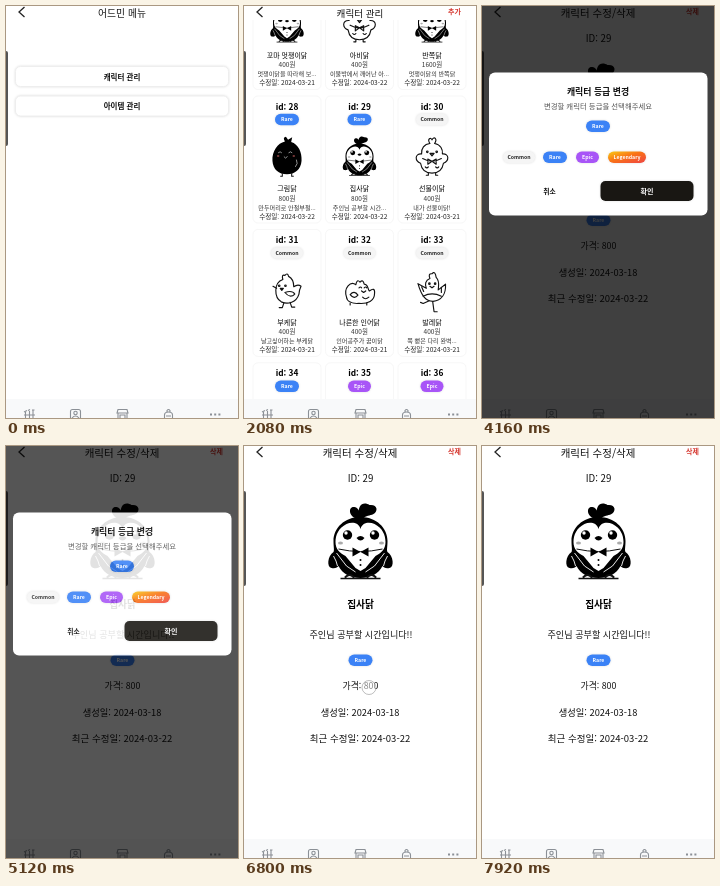
These frames come from a looping animation (232x412 px, 8 s). An HTML page:

```html
<!DOCTYPE html>
<html lang="ko">
<meta charset="utf-8">
<style>
  html, body { margin: 0; width: 100%; height: 100%; overflow: hidden; background: #fff; }
  svg { display: block; width: 232px; height: 412px; }
  text { font-family: "Noto Sans CJK KR", "Noto Sans", sans-serif; white-space: pre; }
  .soft { filter: drop-shadow(0 .6px .8px #0002); }
  .line { fill: #fff; stroke: #111; stroke-width: 2.2; stroke-linejoin: round; stroke-linecap: round; }
  .icon { fill: none; stroke: #8b9096; stroke-width: 1.1; }
  .pic { visibility: var(--pic); }
</style>
<svg id="stage" viewBox="0 0 232 412">
  <defs>
    <linearGradient id="legend" x2="1" y2="1">
      <stop stop-color="#facc15"/><stop offset=".45" stop-color="#f97316"/><stop offset="1" stop-color="#ef4444"/>
    </linearGradient>
    <g id="butler">
      <path d="M-2-23C-12-24-13-36-6-35C-1-34-1-29-1-26C-4-37 3-41 9-37C17-38 18-31 13-28C9-26 6-27 2-23Z"/>
      <path stroke="#111" stroke-width="1.500" d="M-20 36.500H20"/>
      <path d="M0-25C16-25 27-14 27-1C27 5 26 8 27 10C33 14 34 25 29 26C25 27 23 25 22 24C18 32 10 36 0 36C-10 36-18 32-22 24C-23 25-25 27-29 26C-34 25-33 14-27 10C-26 8-27 5-27-1C-27-14-16-25 0-25Z"/>
      <path fill="#fff" d="M0-13C2-20 9-20 14-18C22-14 25-7 25 0C25 7 21 11 15 14L5 26L0 29L-5 26L-15 14C-21 11-25 7-25 0C-25-7-22-14-14-18C-9-20-2-20 0-13Z"/>
      <path fill="none" stroke="#111" d="M-22 7Q0 12 22 7"/>
      <path fill="none" stroke="#fff" stroke-width=".9" d="M-24 11L-14 24L-5 30M24 11L14 24L5 30M-27 14Q-24 19-23 24M27 14Q24 19 23 24"/>
      <circle cx="-13" cy="-7" r="4.700"/><circle cx="14" cy="-7" r="4.700"/>
      <g fill="#fff"><circle cx="-14.500" cy="-9" r="1.700"/><circle cx="12.500" cy="-9" r="1.700"/></g>
      <path d="M-4-4Q0-8 4-4Q0 1-4-4Z"/>
      <path d="M0 10L-8 5.500V14.500ZM0 10L8 5.500V14.500Z"/>
      <circle cy="18" r="1"/><circle cy="23" r="1"/>
      <g fill="#aaa"><ellipse cx="-20" cy="1" rx="2.500" ry="1.500"/><ellipse cx="21" cy="1" rx="2.500" ry="1.500"/></g>
      <g class="line" stroke-width="1"><path d="M-15 35q4-4 8 0M7 35q4-4 8 0"/></g>
    </g>
    <g id="inky">
      <path d="M-4-29Q-9-37-2-38L2-32L10-37L8-28C22-24 29-8 28 8C27 25 15 34 0 34C-16 34-27 25-28 8C-29-10-18-26-4-29Z"/>
      <path d="M-9 32v6h-4M9 32v6h4" stroke="#111" stroke-width="2" fill="none"/>
      <path fill="none" stroke="#bbb" stroke-width="1.500" d="M-17-7q4-4 7 0M3-7q4-4 7 0M-6 0l3 3l4-3M18 6q4 8-2 14"/>
      <path stroke="#d66" stroke-width="2" d="M-19-1h4M11-1h4"/>
    </g>
    <g id="plump" class="line">
      <path d="M-4-25C-10-34-2-38 0-32C4-40 11-34 5-25C17-23 21-13 20-5C34-6 33 9 22 13C20 26 12 32 0 32C-12 32-20 26-22 13C-33 9-34-6-20-5C-21-15-15-24-4-25Z"/>
      <path d="M-18 4Q0 14 18 4M0 9L-8 5V15ZL8 5V15ZM-7 32v4h-4M7 32v4h4M-13 20q3 4 6 0M7 20q3 4 6 0"/>
      <path fill="#999" d="M-4-6H4L0-1Z"/>
      <circle cx="-9" cy="-9" r="1.500"/><circle cx="9" cy="-9" r="1.500"/>
    </g>
    <g id="runner" class="line">
      <path d="M-8-20Q-11-30-4-28Q1-34 3-26C11-22 13-12 13-6Q21-12 27-7Q23 1 23 8C18 24 2 29-11 23C-25 15-26-14-8-20Z"/>
      <path d="M-20-3l-7-4M-4 5Q10 0 15 8Q6 17-4 5M-6 25l-3 9h-6M6 24l3 9h6"/>
      <path fill="#999" d="M-13-3h6l-3 4Z"/>
      <circle cx="-15" cy="-8" r="1.500"/><circle cx="-3" cy="-8" r="1.500"/>
    </g>
    <g id="loaf" class="line">
      <path d="M-25 14C-31-4-17-18-7-10Q-5-22 1-15Q7-21 9-11C18-10 15-1 19 2Q30-6 29 6C29 22 16 27-1 26C-15 27-24 22-25 14Z"/>
      <path d="M-18 9Q-10 0-3 10Q-10 19-18 9M-1-4q3-3 5 0M9-4q3-3 5 0M4 2l4 3l4-3M6 14q5 6 12 0M-18 26v3M14 25v4"/>
    </g>
    <g id="dancer" class="line">
      <path d="M1 20L4 42h6M-3 20l-14 6l-5-2"/>
      <path d="M-4-22Q-8-32 0-31Q6-38 8-24C16-16 12-6 12 0L26-11C27 8 18 20 2 22C-12 22-20 12-27-12L-11-3C-14-10-13-19-4-22Z"/>
      <path d="M-17 12Q0 3 18 12M-4-7l4 3l4-3M18-5v10M-20-6l4 9"/>
      <circle cx="-5" cy="-12" r="1.500"/><circle cx="6" cy="-12" r="1.500"/>
    </g>
  </defs>
</svg>
<script>
const stage = document.getElementById('stage');

const text = (x, y, str, size, fill = '#111', weight = 400) =>
  `<text x="${x}" y="${y + .4 + size * .36}" font-size="${size}" fill="${fill}" font-weight="${weight}" text-anchor="middle">${str}</text>`;
const box = (x, y, w, h, r, attrs) => `<rect x="${x}" y="${y}" width="${w}" height="${h}" rx="${r}" ${attrs}/>`;
const group = (id, body) => `<g id="${id}">${body}</g>`;

const GRADES = {
  Common: ['#f5f5f5', 32, '#222'], Rare: ['#3b82f6', 24, '#fff'],
  Epic: ['#a855f7', 23, '#fff'], Legendary: ['url(#legend)', 38, '#fff'],
};
const badge = (x, y, name) => {
  const [bg, w, ink] = GRADES[name];
  return box(x - w / 2, y - 5.5, w, 11.5, 5.75, `fill="${bg}" class="soft"`) + text(x, y - .4, name, 5.2, ink, 700);
};

const header = (title, size, action = '') =>
  box(0, 0, 232, 14, 0, 'fill="#fff"') + text(116, 7.3, title, size) + text(210.500, 5.3, action, 7, '#d63a32', 600);

const menuButton = (y, label) =>
  box(9.5, y, 213, 20, 5, 'fill="#fff" stroke="#eee" class="soft"') + text(116, y + 10, label, 7.5, '#111', 700);

// picture, name, price, description, day
const birds = [
  ['butler', '꼬마 멋쟁이닭', 400, '멋쟁이닭을 따라해 보...', 21],
  ['plump', '아비닭', 400, '이불밖에서 깨어난 아...', 22],
  ['butler', '반쪽닭', 1600, '멋쟁이닭의 반쪽닭', 22],
  ['inky', '그림닭', 800, '만두머리로 안절부절...', 22],
  ['butler', '집사닭', 800, '주인님 공부할 시간...', 22],
  ['plump', '선물이닭', 400, '내가 선물이닭!', 21],
  ['runner', '부케닭', 400, '날고싶어하는 부케닭', 21],
  ['loaf', '나른한 인어닭', 400, '인어공주가 꿈이닭', 21],
  ['dancer', '발레닭', 400, '쭉 뻗은 다리 완벽...', 21],
];
const ranks = 'Rare Rare Common Common Common Common Rare Epic Epic'.split(' ');

const card = id => {
  const x = [43, 115.500, 188][(id - 1) % 3], y = 38 + Math.floor((id - 1) / 3) * 133.4;
  const [pic, name, price, note, day] = birds[(id + 2) % 9];
  return box(x - 34, y - 10, 68, 127, 5, 'fill="#fff" stroke="#f7f7f7"') +
    text(x, y + .3, 'id: ' + id, 8.3, '#000', 700) + badge(x, y + 13.3, ranks[(id + 8) % 9]) +
    `<use href="#${pic}" class="pic" transform="translate(${x} ${y + 50.5}) scale(.52)"/>` +
    text(x, y + 82.500, name, 7, '#000', 500) + text(x, y + 92, price + '원', 6.5, '#333') +
    text(x, y + 101, note, 6.1, '#333') + text(x, y + 110, `수정일: 2024-03-${day}`, 6.6, '#222');
};

const panel = (id, topic, verb, body) => group(id,
  box(0, 0, 232, 412, 0, 'fill="#000" opacity=".75"') + box(7, 66.500, 218.500, 143, 6, 'fill="#fff"') +
  text(116, 85.500, `캐릭터 ${topic} 변경`, 8.9, '#111', 700) +
  text(116, 99.500, `변경할 캐릭터 ${topic}을 ${verb}해주세요`, 7.4, '#555') + body +
  text(67.500, 185, '취소', 6.8, '#111', 600) +
  box(118.500, 175, 93, 20, 5, 'fill="#191713" class="soft"') + text(165, 185, '확인', 7, '#fff', 600));

const tabs = box(0, 393, 232, 19, 0, 'fill="#f8f9fa"') + `<g class="icon">
  <path d="M18 409H29M19.500 412V406M23.500 412V405M27 412V404M18 406l3-1.500M22 404.500l2-1M26 404h2.500"/>
  <rect x="64.500" y="403.500" width="10" height="10" rx="2"/><circle cx="69.500" cy="407" r="1.700"/><path d="M66 412q3.500-4 7 0"/>
  <path d="M112 403.500H121L122 407H111ZM112 407V413M121 407V413M114 412V409H119V412"/>
  <path d="M158.500 413V409Q158.500 406 162.500 406T166.500 409V413M161 406V404.500q1.500-2 3 0V406M160 410H165"/>
  <path stroke-width="2" stroke-dasharray="2 2.200" d="M204 408.500H215"/></g>`;

stage.innerHTML += group('menu', header('어드민 메뉴', 9.8) + menuButton(60.500, '캐릭터 관리') + menuButton(90, '아이템 관리')) +
  group('list', box(0, 0, 232, 412, 0, 'fill="#fff"') +
    group('rows', Array.from({ length: 36 }, (_, i) => card(i + 1)).join('')) + header('캐릭터 관리', 9.6, '추가')) +
  group('detail', box(0, 0, 232, 412, 0, 'fill="#fff"') + header('캐릭터 수정/삭제', 10.5, '삭제') +
    text(116.500, 32, 'ID: 29', 9.7) + '<use href="#butler" x="116.500" y="96"/>' +
    text(116.500, 158, '집사닭', 9.7, '#000', 700) + text(117, 188, '주인님 공부할 시간입니다!!', 9.1) +
    badge(116.500, 214, 'Rare') + text(116.500, 239.500, '가격: 800', 8.8) +
    text(116, 266.500, '생성일: 2024-03-18', 9.3) + text(116, 292, '최근 수정일: 2024-03-22', 9.5)) +
  tabs + '<path d="M18.500 1L13 6L18.500 11" fill="none" stroke="#222" stroke-width="1.300"/>' +
  box(-2, 45, 4, 95, 2, 'fill="#555"') +
  panel('grade', '등급', '선택', badge(116, 120, 'Rare') + badge(37, 151, 'Common') +
    badge(73, 151, 'Rare') + badge(105.500, 151, 'Epic') + badge(145, 151, 'Legendary')) +
  panel('price', '가격', '입력', text(116, 136, '800', 9)) +
  '<circle id="touch" r="7" fill="#fff" fill-opacity=".5" stroke="#777" stroke-opacity=".6" stroke-width=".8"/>';

const el = id => document.getElementById(id);
const ramp = (t, from, to) => Math.min(1, Math.max(0, (t - from) / (to - from)));
const show = (id, opacity) => {
  el(id).style.opacity = opacity;
  el(id).style.display = opacity > 0 ? '' : 'none';
};

// start, end, x, y
const touches = [[560, 720, 115, 71], [2560, 2720, 115, 150], [3520, 3680, 123.5, 209.5],
  [5760, 5900, 121.5, 214], [6720, 6880, 125, 241.5]];

function draw(now) {
  const t = now % 8000;
  show('menu', 1 - ramp(t, 680, 900));
  show('list', t < 3000 ? ramp(t, 680, 960) : 0);
  show('detail', ramp(t, 2700, 2980));
  show('grade', ramp(t, 3640, 3920) - ramp(t, 5080, 5440) + ramp(t, 5880, 6040) - ramp(t, 6280, 6560));
  show('price', ramp(t, 6860, 7120) - ramp(t, 7480, 7760));

  const glide = (1 - Math.cos(Math.PI * ramp(t, 1200, 2080))) / 2;
  el('rows').setAttribute('transform', `translate(0 ${-1138.6 * glide})`);
  el('rows').style.setProperty('--pic', t < 1120 ? 'hidden' : 'visible');

  const touch = touches.find(([from, to]) => t >= from && t < to);
  show('touch', touch ? 1 : 0);
  if (touch) el('touch').setAttribute('transform', `translate(${touch[2]} ${touch[3]})`);
  requestAnimationFrame(() => draw(performance.now() - start));
}
const start = performance.now();
draw(0);
</script>
</html>
```
